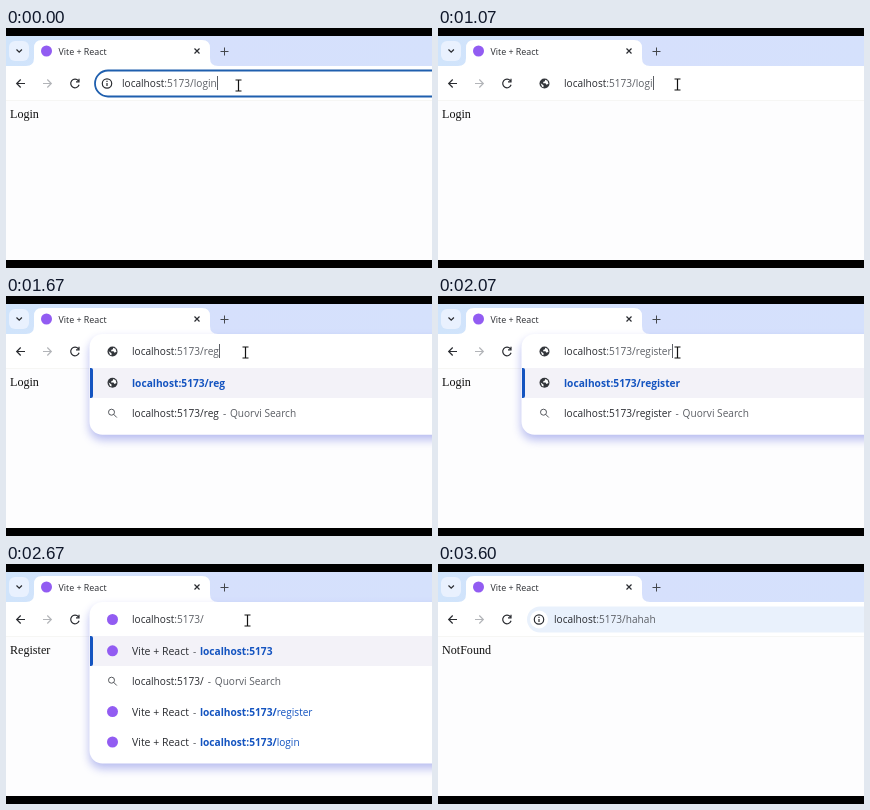
Animation, 426 px wide and 240 px high, one loop 3670 ms. Source, as an HTML page with a canvas:

```html
<!DOCTYPE html>
<html lang="en">
<head>
<meta charset="utf-8">
<title>Router demo</title>
<style>
  html, body { margin: 0; height: 100%; overflow: hidden; background: #000; }
  canvas { display: block; }
</style>
</head>
<body>
<canvas id="stage" width="426" height="240"></canvas>
<script>
const ctx = document.getElementById('stage').getContext('2d');
const LOOP = 3670, ROW = 30.4;
const INK = '#292b30', GREY = '#5c5f65', BLUE = '#1454c0', LOGO = '#925cf2';
const SANS = '"Open Sans", sans-serif', SERIF = '"Liberation Serif", serif';

const strip = ctx.createLinearGradient(0, 0, 426, 0);
strip.addColorStop(0, '#d0e4fb');
strip.addColorStop(.5, '#d6e0fc');
strip.addColorStop(1, '#d5e1fc');

// Timeline of address bar states
const states = [];
const at = (time, path, mode, page) => states.push({ time, path, mode, page });
function erase(start, step, word, page) {
  for (let n = word.length - 1, t = start; n >= 0; n--, t += step)
    at(t, word.slice(0, n), t === start ? 'bare' : 'list', page);
}
function type(start, step, word, page, from = 1) {
  for (let n = from; n <= word.length; n++)
    at(start + (n - from) * step, word.slice(0, n), 'list', page);
}
at(0, 'login', 'focus', 'Login');
erase(130, 50, 'login', 'Login');
at(600, 'login', 'idle', 'Login');
at(870, 'login', 'focus', 'Login');
erase(1065, 66, 'login', 'Login');
type(1465, 66, 'reg', 'Login');
type(1733, 66, 'register', 'Login', 4);
at(2130, 'register', 'idle', 'Register');
at(2200, 'register', 'focus', 'Register');
erase(2260, 28, 'register', 'Register');
type(2800, 80, 'hahah', 'Register');
at(3265, 'hahah', 'idle', 'NotFound');

const mouse = [[0, 232.5, 57], [200, 232.5, 57], [500, 229.5, 57], [700, 229.5, 57],
  [950, 239.5, 56], [2100, 239.5, 56], [2300, 241.5, 56], [3265, 241.5, 56]];

function text(str, x, y, color = INK, size = 10.1, weight = 400, family = SANS) {
  ctx.font = `${weight} ${size}px ${family}`;
  ctx.fillStyle = color;
  ctx.fillText(str, x, y);
  return x + ctx.measureText(str).width;
}
const bold = (str, x, y) => text(str, x, y, BLUE, 10.2, 700);
function rect(x, y, w, h, color) {
  ctx.fillStyle = color;
  ctx.fillRect(x, y, w, h);
}
function box(x, y, w, h, r, color) {
  ctx.beginPath();
  ctx.roundRect(x, y, w, h, r);
  ctx.fillStyle = color;
  ctx.fill();
}
function disc(x, y, r, color) {
  ctx.beginPath();
  ctx.arc(x, y, r, 0, 7);
  ctx.fillStyle = color;
  ctx.fill();
}
function line(d, color = INK, width = 1.2) {
  ctx.strokeStyle = color;
  ctx.lineWidth = width;
  ctx.stroke(new Path2D(d));
}

const icons = {
  logo: (x, y) => disc(x, y, 5.5, LOGO),
  globe(x, y) {
    disc(x, y, 5, '#33363b');
    ctx.fillStyle = '#fff';
    ctx.fill(new Path2D(`M${x + .5} ${y - 3.8}l2.5 1 1 3-2 1-1-1.5h-2.5l.5-1.5 1.5-.5z
      M${x - 3.8} ${y - .2}l2.8 2v2l-1.5-.5z`));
  },
  search(x, y) {
    line(`M${x - 4} ${y - 1}a3 3 0 1 1 6 0a3 3 0 1 1-6 0M${x + 1} ${y + 1}l3.3 3.3`, '#55585d', 1);
  },
  info(x, y) {
    disc(x, y, 9, '#fff');
    line(`M${x - 4.7} ${y}a4.7 4.7 0 1 1 9.4 0a4.7 4.7 0 1 1-9.4 0M${x} ${y - .6}v3.2M${x} ${y - 2.8}v1.3`);
  }
};

function drawChrome() {
  rect(0, 8, 426, 30, strip);
  box(3, 13, 20, 20, 6, '#e9f1fe');
  line('M10.5 21.5l2.7 2.7 2.7-2.7');
  ctx.fillStyle = '#fff';
  ctx.fill(new Path2D('M20 38q8 0 8-8V20q0-8 8-8H196q8 0 8 8v10q0 8 8 8z'));
  icons.logo(40.5, 23);
  text('Vite + React', 52.5, 27, INK, 8.9);
  line('M188.5 20.5l5 5m0-5l-5 5');
  line('M214.5 23.5h8M218.5 19.5v8', '#44474c', 1);
  rect(0, 38, 426, 34, '#fff');
  rect(0, 72, 426, 1, '#f6f6f4');
  line('M19 55.5h-8.3m4-4l-4 4 4 4');
  line('M37 55.5h8.3m-4-4l4 4-4 4', '#b2b4b8');
  line('M72.4 52.8a4.3 4.3 0 1 0 .7 4M73 50.8v3h-3');
}

// Draws the separator and returns where the next part begins
function dash(x, y) {
  text('-', x + 4, y, GREY);
  return x + 11;
}

function drawList({ path, page }) {
  const seen = page === 'Register' ? ['register', 'login'] : ['login'];
  const mainIcon = !path && seen.length > 1 ? 'logo' : 'globe';
  const host = 'localhost:5173', url = `${host}/${path}`;
  const titled = (match, rest = '') => y => {
    const x = dash(text('Vite + React', 126, y, INK, 10.5), y);
    text(rest, bold(match, x, y), y, BLUE);
  };
  const rows = [
    [mainIcon, path ? y => bold(url, 126, y) : titled(host)],
    ['search', y => text('Quorvi Search', dash(text(url, 126, y), y), y, GREY)],
    ...seen.filter(p => p.startsWith(path)).map(p => ['logo', titled(url, p.slice(path.length))])
  ];

  ctx.save();
  ctx.shadowColor = 'rgba(110,120,225,.5)';
  ctx.shadowBlur = 10;
  ctx.shadowOffsetY = 5;
  box(83.5, 38, 380, 40 + rows.length * ROW, 13, '#fff');
  ctx.restore();
  rect(84, 72, 342, 30, '#f3f2f8');
  box(84, 72, 3, 30, [0, 2, 2, 0], BLUE);
  rows.forEach(([icon, draw], i) => {
    const y = 86.8 + i * ROW;
    icons[icon](106.5, y);
    draw(y + 4);
  });
  icons[mainIcon](106.5, 55.5);
}

function drawAddress(state, age) {
  const { mode, path } = state;
  const inset = mode === 'list' || mode === 'bare';
  if (mode === 'list') drawList(state);
  else if (mode === 'bare') icons.globe(106.5, 55.5);
  else {
    box(89, 42.5, 400, 26, 13, mode === 'focus' ? '#fff' : '#e9f1fc');
    if (mode === 'focus') {
      ctx.strokeStyle = '#1f5fae';
      ctx.lineWidth = 1.8;
      ctx.stroke();
    }
    icons.info(101, 55.5);
  }
  const hostEnd = text('localhost', inset ? 126 : 116, 59);
  const end = text(':5173/' + path, hostEnd, 59, GREY);
  if (mode !== 'idle' && age % 400 < 200) rect(Math.round(end), 48, 1, 14, GREY);
}

function drawMouse(t) {
  const i = mouse.findIndex(k => k[0] > t);
  if (i < 0) return;
  const [t0, x0, y0] = mouse[i - 1], [t1, x1, y1] = mouse[i];
  const k = (t - t0) / (t1 - t0);
  const x = x0 + (x1 - x0) * k, y = y0 + (y1 - y0) * k;
  line(`M${x - 3} ${y - 5}h6m-3 0v11m-3 0h6`, '#111');
}

function frame(now) {
  const t = now % LOOP;
  const state = states.findLast(s => s.time <= t);
  rect(0, 0, 426, 240, '#fdfdfe');
  drawChrome();
  text(state.page, 4, 90, '#111', 12.1, 400, SERIF);
  drawAddress(state, t - state.time);
  drawMouse(t);
  rect(0, 0, 426, 8, '#000');
  rect(0, 232, 426, 8, '#000');
}

const start = performance.now();
(function tick() {
  frame(performance.now() - start);
  requestAnimationFrame(tick);
})();
</script>
</body>
</html>
```
